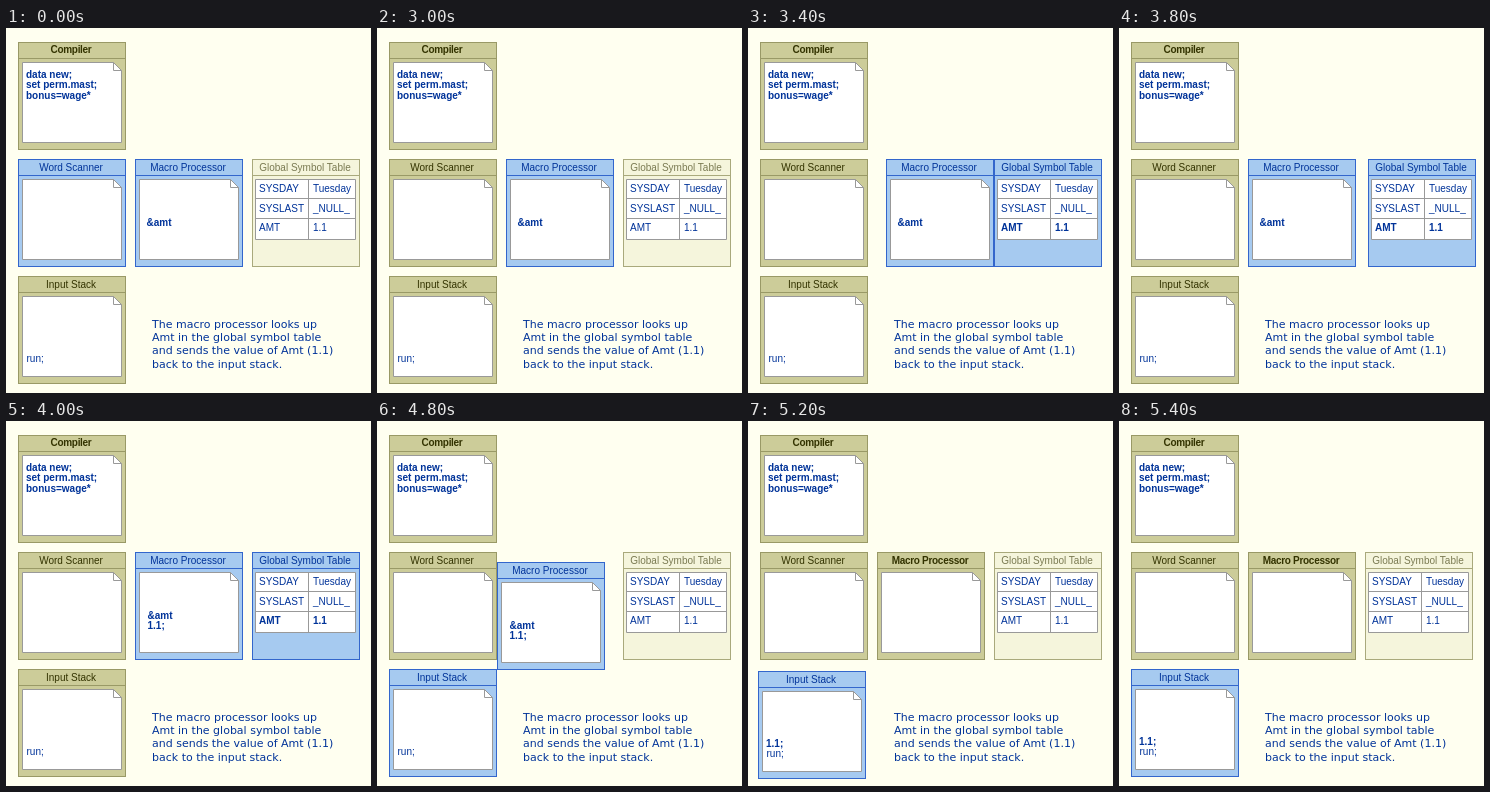
Animation of 365x365 px, one loop 5.6 s. Source, as an HTML page:

```html
<!DOCTYPE html>
<html lang="en">
<head>
<meta charset="utf-8">
<title>Macro processor</title>
<style>
html, body { margin: 0; width: 100%; height: 100%; overflow: hidden; background: #fffff0; }
svg { display: block; width: 100vw; height: 100vh; }
text { font: 10px "Liberation Sans", Arial, sans-serif; fill: #039; stroke: none; white-space: pre; }
.bold { font-weight: bold; }
.title { fill: currentColor; text-anchor: middle; }
.heavy { font-weight: bold; letter-spacing: -.3px; }
.sheet { fill: #fff; stroke: #999; }
.caption text { font: 11px "DejaVu Sans", Verdana, sans-serif; }

.olive { fill: #cc9; stroke: #996; color: #330; }
.blue { fill: #a6caf0; stroke: #36c; color: #039; }
.pale { fill: #f5f5dc; stroke: #a9a97c; color: #7a7a52; }

.anim { animation: 5.6s step-end infinite; }
.scanner { animation-name: scanner; }
.macro { animation-name: macro-skin, macro-move; }
.macro-title { animation-name: macro-title; }
.symbols { animation-name: symbols-skin, symbols-move; }
.amt { animation-name: amt; }
.stack { animation-name: stack-skin, stack-move; }
.query { animation-name: query; }
.answer { animation-name: answer; }
.result { animation-name: result; }

@keyframes scanner {
  0% { fill: #a6caf0; stroke: #36c; color: #039; }
  53.571%, 100% { fill: #cc9; stroke: #996; color: #330; }
}
@keyframes macro-skin {
  0% { fill: #a6caf0; stroke: #36c; color: #039; }
  92.857%, 100% { fill: #cc9; stroke: #996; color: #330; }
}
@keyframes macro-move {
  0% { transform: translate(0, 0); }
  57.142% { transform: translate(-3px, 0); }
  60.714% { transform: translate(9px, 0); }
  67.857% { transform: translate(0, 0); }
  85.714% { transform: translate(-9px, 10px); }
  92.857%, 100% { transform: translate(0, 0); }
}
@keyframes macro-title {
  0% { font-weight: 400; letter-spacing: 0; }
  92.857%, 100% { font-weight: 700; letter-spacing: -.3px; }
}
@keyframes symbols-skin {
  0% { fill: #f5f5dc; stroke: #a9a97c; color: #7a7a52; }
  60.714% { fill: #a6caf0; stroke: #36c; color: #039; }
  85.714%, 100% { fill: #f5f5dc; stroke: #a9a97c; color: #7a7a52; }
}
@keyframes symbols-move {
  0% { transform: translate(0, 0); }
  64.285% { transform: translate(3px, 0); }
  71.428%, 100% { transform: translate(0, 0); }
}
@keyframes amt {
  0% { font-weight: 400; }
  60.714% { font-weight: 700; }
  85.714%, 100% { font-weight: 400; }
}
@keyframes stack-skin {
  0% { fill: #cc9; stroke: #996; color: #330; }
  85.714%, 100% { fill: #a6caf0; stroke: #36c; color: #039; }
}
@keyframes stack-move {
  0% { transform: translate(0, 0); }
  89.285% { transform: translate(-2px, 2px); }
  96.428%, 100% { transform: translate(0, 0); }
}
@keyframes query {
  0% { opacity: 1; }
  71.428%, 100% { opacity: 0; }
}
@keyframes answer {
  0% { opacity: 0; }
  71.428% { opacity: 1; }
  92.857%, 100% { opacity: 0; }
}
@keyframes result {
  0% { opacity: 0; }
  92.857%, 100% { opacity: 1; }
}
</style>
</head>
<body>
<svg viewBox="0 0 365 365">
  <defs>
    <g id="box">
      <rect x=".5" y=".5" width="107" height="107"/>
      <path d="M0 16.5H108"/>
    </g>
    <g id="page">
      <use href="#box"/>
      <path class="sheet" d="M4.5 20.5H95.5L103.5 28.5V100.5H4.5Z"/>
      <path class="sheet" d="M95.5 20.5V28.5H103.5Z"/>
    </g>
  </defs>

  <g transform="translate(12 14)">
    <g class="olive">
      <use href="#page"/>
      <text class="title heavy" x="53" y="11">Compiler</text>
      <text class="bold" x="8" y="36">data new;</text>
      <text class="bold" x="8" y="46">set perm.mast;</text>
      <text class="bold" x="8" y="57">bonus=wage*</text>
    </g>
  </g>

  <g transform="translate(12 131)">
    <g class="blue anim scanner">
      <use href="#page"/>
      <text class="title" x="53" y="12">Word Scanner</text>
    </g>
  </g>

  <g transform="translate(246 131)">
    <g class="pale anim symbols">
      <use href="#box"/>
      <text class="title" x="53" y="12">Global Symbol Table</text>
      <path class="sheet" d="M3.5 20.5H103.5V80.5H3.5ZM3.5 39.5H103.5M3.5 59.5H103.5M56.5 20.5V80.5"/>
      <text x="7" y="33">SYSDAY</text><text x="61" y="33">Tuesday</text>
      <text x="7" y="53">SYSLAST</text><text x="61" y="53">_NULL_</text>
      <text class="anim amt" x="7" y="72">AMT</text><text class="anim amt" x="61" y="72">1.1</text>
    </g>
  </g>

  <g transform="translate(12 248)">
    <g class="olive anim stack">
      <use href="#page"/>
      <text class="title" x="53" y="12">Input Stack</text>
      <text class="bold anim result" x="8" y="76">1.1;</text>
      <text x="8.5" y="86">run;</text>
    </g>
  </g>

  <g transform="translate(129 131)">
    <g class="blue anim macro">
      <use href="#page"/>
      <text class="title anim macro-title" x="53" y="12">Macro Processor</text>
      <text class="bold anim query" x="11.5" y="67">&amp;amt</text>
      <g class="anim answer">
        <text class="bold" x="12.5" y="67">&amp;amt</text>
        <text class="bold" x="12.5" y="77">1.1;</text>
      </g>
    </g>
  </g>

  <g class="caption">
    <text x="146" y="300">The macro processor looks up</text>
    <text x="146" y="313">Amt in the global symbol table</text>
    <text x="146" y="326">and sends the value of Amt (1.1)</text>
    <text x="146" y="340">back to the input stack.</text>
  </g>
</svg>
</body>
</html>
```
